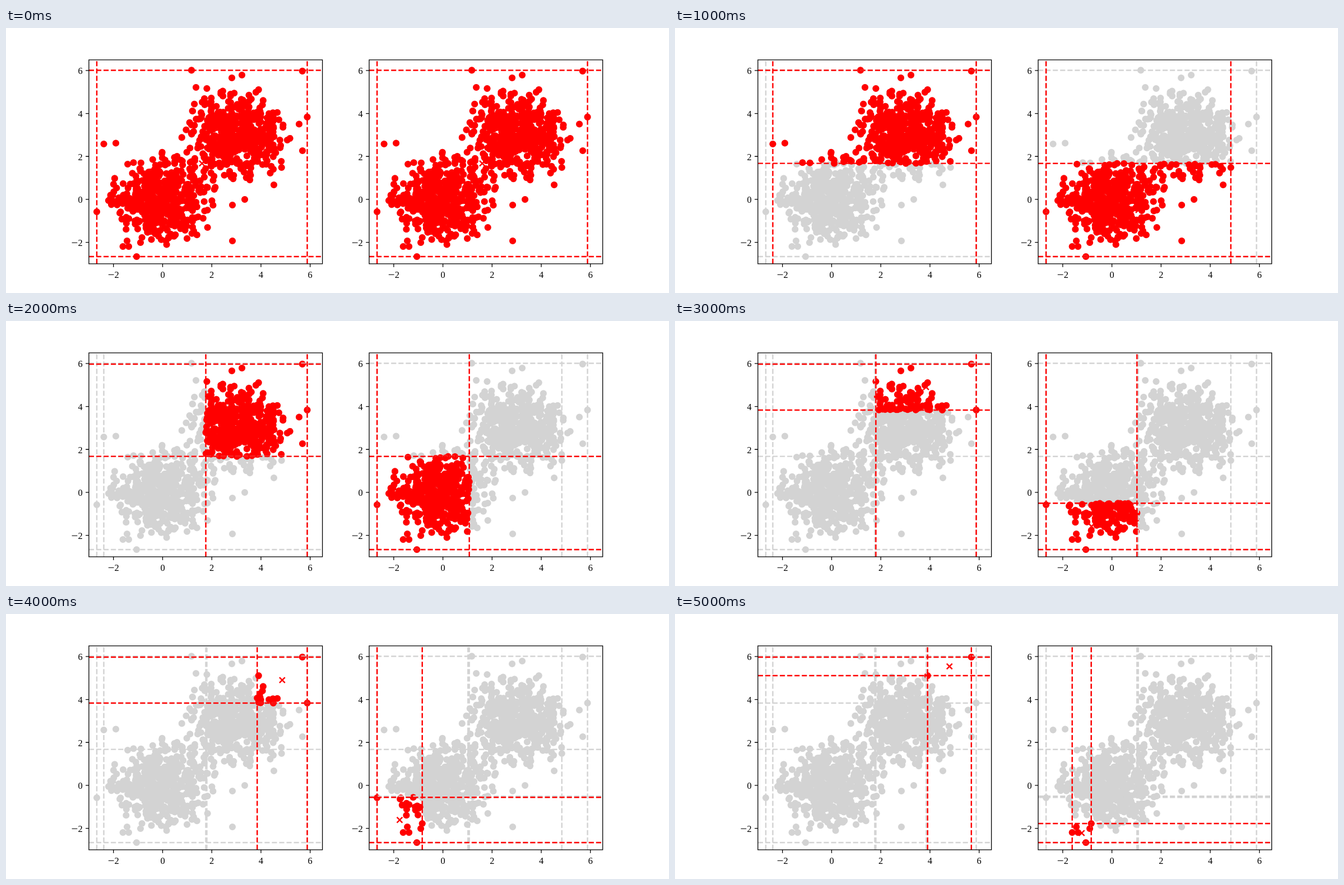
An HTML page for the animation above (6000 ms loop, 1183x473 px).

```html
<!DOCTYPE html>
<html lang="en">
<head>
<meta charset="utf-8">
<title>Box splitting</title>
<style>
  html, body { margin: 0; width: 100%; height: 100%; overflow: hidden; background: #fff; }
  svg { display: block; width: 100%; height: 100%; }
  path { fill: none; }
  .dots { stroke-width: 12.1; stroke-linecap: round; }
  .lines { stroke-width: 2.46; stroke-dasharray: 9.12 3.94; }
  .cross { stroke-width: 2.46; }
  .old { stroke: #d3d3d3; }
  .live { stroke: #f00; }
  .frame { stroke: #000; stroke-width: 1.31; }
  text { font: 16.4px "Liberation Serif", "Times New Roman", serif; }
  .minus { font-size: 21px; }
</style>
</head>
<body>
<svg id="stage" viewBox="0 0 1183 473"></svg>
<script>
const NS = 'http://www.w3.org/2000/svg';
const STEP = 1000, STEPS = 6, PANEL_GAP = 500.1;
const LEFT = 147.9, RIGHT = 564.6, TOP = 56.8, BOTTOM = 420.9;
const UNIT_X = (RIGHT - LEFT) / 9.5, UNIT_Y = (BOTTOM - TOP) / 9.5;
const px = v => LEFT + (v + 3) * UNIT_X;
const py = v => BOTTOM - (v + 3) * UNIT_Y;

// Points that set the box edges, then a few strays
const KEY_POINTS = [
  [162, 328], [537.5, 158.9], [331, 75.4], [233, 408], [174.5, 207], [528.8, 76.9],
  [450.7, 110.1], [448.2, 150], [430, 241.5], [358.4, 108], [491.7, 249],
  [208.6, 390], [219, 390], [216, 380], [240, 383], [242.6, 374],
  [196, 205.5], [421, 84], [403, 89], [339, 106], [523, 171.5], [529, 219],
  [404, 380], [404, 316], [426, 306], [478, 280]
];

function seeded(a) {
  return () => {
    a = a + 0x6D2B79F5 | 0;
    let t = Math.imul(a ^ a >>> 15, 1 | a);
    t = t + Math.imul(t ^ t >>> 7, 61 | t) ^ t;
    return ((t ^ t >>> 14) >>> 0) / 4294967296;
  };
}

// The outer corners hold key points only
const inCorner = (x, y) => (x < -0.8 && y < -1.5) || (x > 3.8 && y > 4.8);

// Normal cloud of unit spread, cut off at a fixed radius
function cloud(center, count, random) {
  const limit = 2.25, inside = 1 - Math.exp(-limit * limit / 2);
  const list = [];
  for (let i = 0; i < count; i++) {
    const r = Math.sqrt(-2 * Math.log(1 - inside * (i + 0.5) / count));
    const angle = random() * 2 * Math.PI;
    const x = center + r * Math.cos(angle), y = center + r * Math.sin(angle);
    if (!inCorner(x, y)) list.push([px(x), py(y)]);
  }
  return list;
}

const random = seeded(42);
const points = [...cloud(0, 465, random), ...cloud(3, 465, random), ...KEY_POINTS];

function bounds(list) {
  const xs = list.map(p => p[0]), ys = list.map(p => p[1]);
  return [Math.min(...xs), Math.max(...xs), Math.min(...ys), Math.max(...ys)];
}

// Halve the box by height, then by width, in turn, and shrink it to the points kept.
// side 1 keeps the upper right halves, side -1 the lower left ones.
function splitSteps(side) {
  const steps = [{ kept: points, box: bounds(points) }];
  for (let i = 1; i < STEPS; i++) {
    const { kept, box: [l, r, t, b] } = steps[i - 1];
    const half = i % 2
      ? kept.filter(p => side * ((t + b) / 2 - p[1]) >= 0)
      : kept.filter(p => side * (p[0] - (l + r) / 2) >= 0);
    steps.push({ kept: half, box: bounds(half) });
  }
  return steps;
}

function add(parent, name, attrs) {
  const node = document.createElementNS(NS, name);
  for (const key in attrs) node.setAttribute(key, attrs[key]);
  return parent.appendChild(node);
}

const dotPath = list => list.map(([x, y]) => `M${x.toFixed(1)} ${y.toFixed(1)}h.01`).join('');
const boxPath = ([l, r, t, b]) =>
  [t, b].map(y => `M${LEFT} ${y}H${RIGHT}`).join('') +
  [l, r].map(x => `M${x} ${BOTTOM}V${TOP}`).join('');

function crossPath([l, r, t, b]) {
  const x = (l + r) / 2, y = (t + b) / 2, h = 4.93;
  return `M${x - h} ${y - h}l${2 * h} ${2 * h}m0 ${-2 * h}l${-2 * h} ${2 * h}`;
}

function label(parent, value, x, y, anchor) {
  const text = add(parent, 'text', { x, y, 'text-anchor': anchor });
  if (value < 0) {
    add(text, 'tspan', { class: 'minus', dy: 1.2 }).textContent = '−';
    add(text, 'tspan', { dy: -1.2 }).textContent = -value;
  } else {
    text.textContent = value;
  }
}

function makePanel(side, index) {
  const steps = splitSteps(side);
  const g = add(document.getElementById('stage'), 'g', {
    transform: `translate(${index * PANEL_GAP} 0)`
  });
  const layer = name => add(g, 'path', { class: name });
  layer('dots old').setAttribute('d', dotPath(points));
  const dots = layer('dots live');
  const cross = layer('cross live');
  const oldLines = layer('lines old');
  const liveLines = layer('lines live');

  let axes = `M${LEFT} ${TOP}H${RIGHT}V${BOTTOM}H${LEFT}Z`;
  for (let v = -2; v <= 6; v += 2) {
    axes += `M${px(v)} ${BOTTOM}v5.75M${LEFT} ${py(v)}h-5.75`;
    label(g, v, px(v), 446, 'middle');
    label(g, v, 136.6, py(v) + 6.4, 'end');
  }
  layer('frame').setAttribute('d', axes);

  return step => {
    const { kept, box } = steps[step];
    dots.setAttribute('d', dotPath(kept));
    cross.setAttribute('d', crossPath(box));
    oldLines.setAttribute('d', steps.slice(0, step).map(s => boxPath(s.box)).join(''));
    liveLines.setAttribute('d', boxPath(box));
  };
}

const panels = [1, -1].map(makePanel);
const start = performance.now();
let shown = -1;

function draw() {
  const step = Math.floor((performance.now() - start) / STEP) % STEPS;
  if (step !== shown) {
    panels.forEach(show => show(step));
    shown = step;
  }
  requestAnimationFrame(draw);
}
draw();
</script>
</body>
</html>
```
